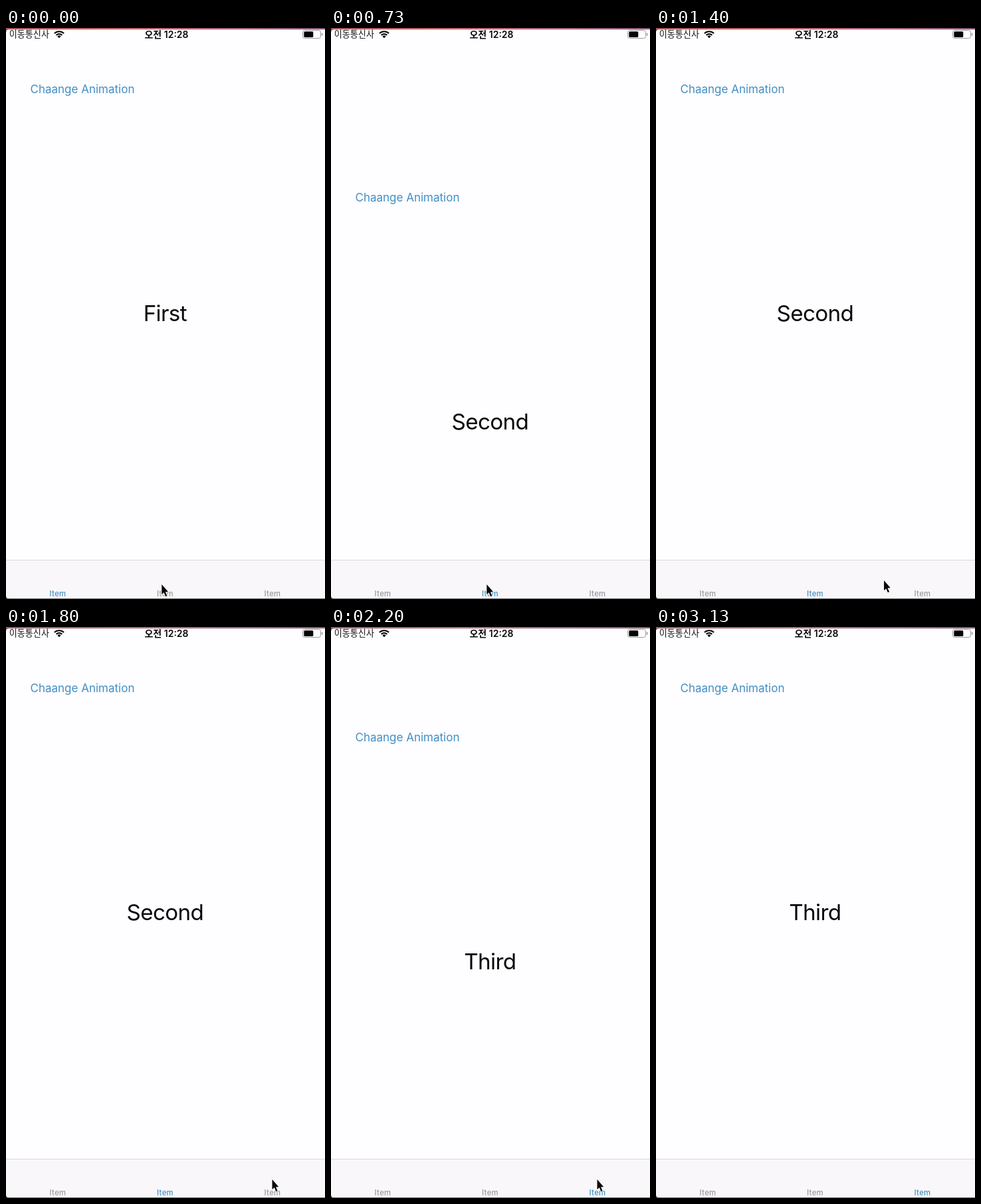
Write an HTML page with a canvas that moves like this. It is 480x859 px and loops after 3270 ms.

```html
<!DOCTYPE html>
<html lang="ko">
<head>
<meta charset="utf-8">
<title>Tab transition</title>
<style>
html, body { margin: 0; width: 100%; height: 100%; overflow: hidden; background: #fefdff; }
canvas { display: block; width: 480px; height: 859px; }
</style>
</head>
<body>
<canvas id="stage"></canvas>
<script>
const W = 480, H = 859, PAGE = 862;
const LOOP = 3270, TICK = 200 / 3, SLIDE = 493;
const BLUE = '#418fc4', GRAY = '#98979a';
const SANS = 'Inter, "Noto Sans CJK KR", "Noto Sans CJK", sans-serif';
const TITLES = ['First', 'Second', 'Third'];
const TAB_X = [78, 239.5, 401];
const SLIDES = [389, 1808];
const TAB_TAPS = [440, 1840];
// time, x, y of the pointer tip
const POINTER = [[935, 234.3, 837], [1400, 343, 831], [1467, 357.5, 831], [1533, 400.5, 831]];
const POINTER_END = 2300;

const canvas = document.getElementById('stage');
const ctx = canvas.getContext('2d');
const dpr = window.devicePixelRatio || 1;
canvas.width = W * dpr;
canvas.height = H * dpr;
ctx.scale(dpr, dpr);

function text(str, x, y, font, color, align = 'left', spacing = 0) {
  ctx.font = font + ' ' + SANS;
  ctx.letterSpacing = spacing + 'px';
  ctx.textAlign = align;
  ctx.fillStyle = color;
  ctx.fillText(str, x, y);
}

function rect(x, y, w, h, color) {
  ctx.fillStyle = color;
  ctx.fillRect(x, y, w, h);
}

function box(x, y, w, h, r) {
  ctx.beginPath();
  ctx.roundRect(x, y, w, h, r);
}

// cubic-bezier(0.42, 0, 0.58, 1)
function easeInOut(t) {
  if (t <= 0) return 0;
  if (t >= 1) return 1;
  let lo = 0, hi = 1;
  for (let i = 0; i < 24; i++) {
    const s = (lo + hi) / 2, u = 1 - s;
    const x = 1.26 * s * u * u + 1.74 * s * s * u + s * s * s;
    if (x < t) lo = s; else hi = s;
  }
  return lo * lo * (3 - 2 * lo);
}

function drawPage(i, dy) {
  if (Math.abs(dy) >= PAGE) return;
  text('Chaange Animation', 36.5, 97.8 + dy, '400 17px', BLUE);
  text(TITLES[i], 239.3, 441 + dy, '400 33.2px', '#080808', 'center', -0.65);
}

function drawWifi() {
  const x = 80, y = 15.2, a = -Math.PI * 3 / 4, b = -Math.PI / 4;
  ctx.fillStyle = ctx.strokeStyle = '#050505';
  ctx.beginPath();
  ctx.moveTo(x, y);
  ctx.arc(x, y, 3.7, a, b);
  ctx.fill();
  ctx.lineWidth = 2.1;
  for (const r of [6.2, 10]) {
    ctx.beginPath();
    ctx.arc(x, y, r, a, b);
    ctx.stroke();
  }
}

function drawBattery() {
  ctx.lineWidth = 1;
  ctx.strokeStyle = '#9b9a9c';
  box(446.5, 3.5, 27, 12, 3);
  ctx.stroke();
  ctx.fillStyle = '#050505';
  box(448.3, 5.2, 14, 8.8, 1.5);
  ctx.fill();
  ctx.fillStyle = '#9b9a9c';
  box(474.8, 7.5, 1.6, 4.2, [0, 1, 1, 0]);
  ctx.fill();
}

function drawStatusBar() {
  text('이동통신사', 4.7, 14.3, '400 13.1px', '#161616');
  drawWifi();
  text('오전 12:28', 241.5, 15, '600 14px', '#080808', 'center');
  drawBattery();
}

function drawTabBar(active) {
  rect(0, 801, W, H - 801, '#f9f7fa');
  rect(0, 800, W, 1, '#d9d8da');
  TAB_X.forEach((x, i) =>
    text('Item', x, 855, '500 11.3px', i === active ? BLUE : GRAY, 'center', 0.3));
}

function corner(y, dir) {
  ctx.beginPath();
  ctx.moveTo(0, y);
  ctx.lineTo(5, y);
  ctx.quadraticCurveTo(0, y, 0, y + 5 * dir);
  ctx.fill();
}

function drawEdges() {
  const strip = ctx.createLinearGradient(0, 0, W, 0);
  strip.addColorStop(0, '#a8555a');
  strip.addColorStop(0.4, '#c0666f');
  strip.addColorStop(0.75, '#a5647e');
  strip.addColorStop(1, '#7d5570');
  rect(0, 0, W, 2, strip);
  rect(0, 2, W, 1, 'rgba(150,110,120,0.25)');
  ctx.fillStyle = '#6b4a50';
  corner(2, 1);
  rect(0, 858, W, 1, '#6f6e70');
  ctx.fillStyle = '#1c1c1c';
  corner(H, -1);
}

function pointerAt(t) {
  let prev = POINTER[0];
  for (const next of POINTER) {
    if (t < next[0]) {
      const k = Math.max(0, (t - prev[0]) / (next[0] - prev[0] || 1));
      return [prev[1] + (next[1] - prev[1]) * k, prev[2] + (next[2] - prev[2]) * k];
    }
    prev = next;
  }
  return [prev[1], prev[2]];
}

function drawPointer(t) {
  if (t >= POINTER_END) return;
  const [x, y] = pointerAt(t);
  const shape = [[0, 0], [0, 15.3], [3.3, 12.2], [5.8, 18.2], [8.1, 17.2], [5.6, 11.5], [9.8, 11.2]];
  ctx.beginPath();
  shape.forEach(([px, py]) => ctx.lineTo(x + px, y + py));
  ctx.closePath();
  ctx.lineJoin = 'round';
  ctx.lineWidth = 2;
  ctx.strokeStyle = '#fff';
  ctx.stroke();
  ctx.fillStyle = '#080808';
  ctx.fill();
}

function draw(t) {
  rect(0, 0, W, H, '#fefdff');
  const scroll = SLIDES.reduce((sum, start) => sum + easeInOut((t - start) / SLIDE), 0);
  TITLES.forEach((_, i) => drawPage(i, (i - scroll) * PAGE));
  drawStatusBar();
  drawTabBar(TAB_TAPS.filter(tap => t >= tap).length);
  drawEdges();
  drawPointer(t);
}

function snap(t) {
  return Math.floor((t + 3.4) / TICK) * TICK;
}

const begin = performance.now();
function loop() {
  draw(snap((performance.now() - begin) % LOOP));
  requestAnimationFrame(loop);
}
loop();
</script>
</body>
</html>
```
